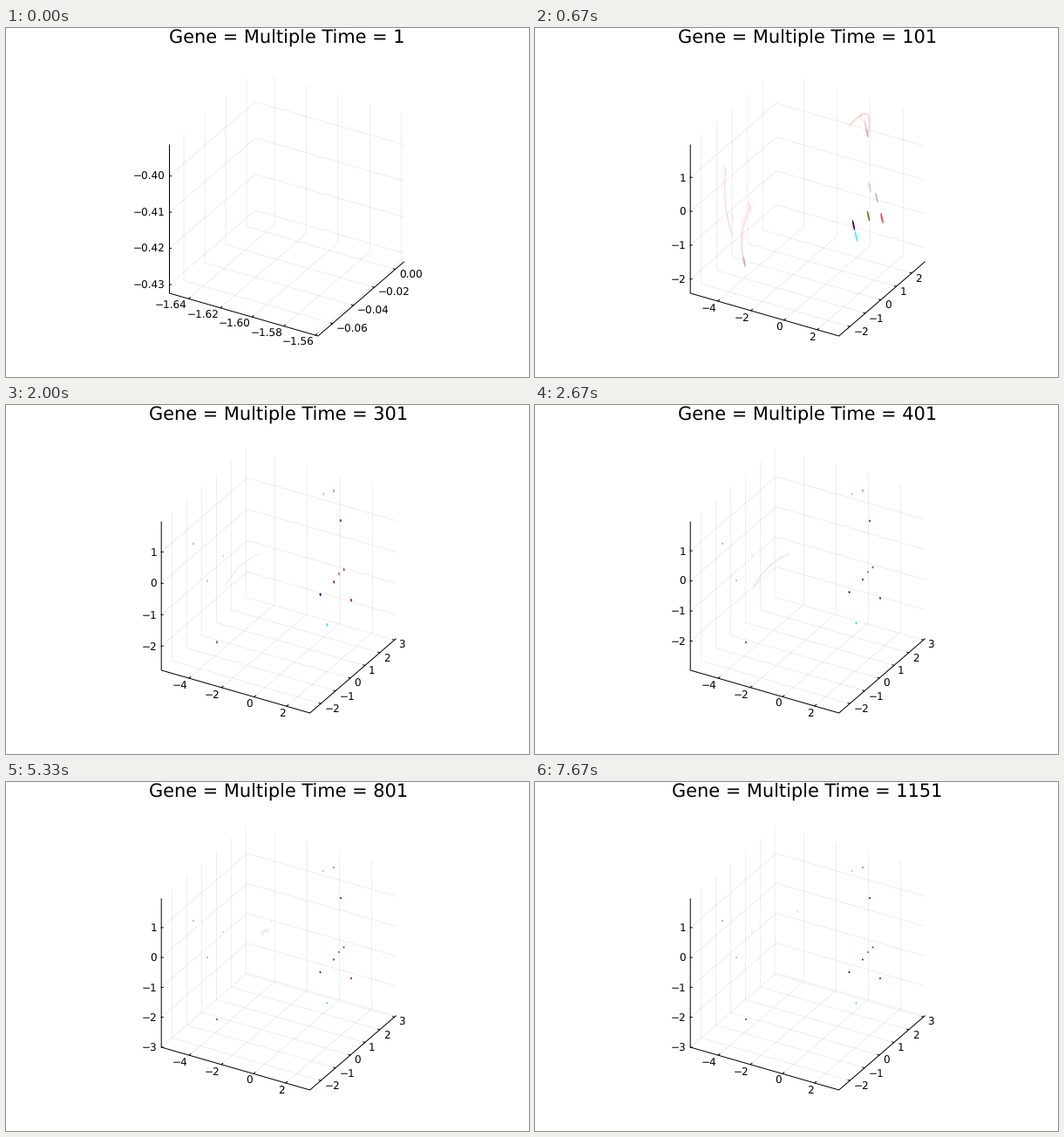
Animation, 600 px wide and 400 px high, one loop 8 s. Source, as a matplotlib script:

```python
import math
import numpy as np
import matplotlib.pyplot as plt
from matplotlib.animation import FuncAnimation
from matplotlib.colors import to_rgb
from matplotlib.patches import Ellipse

W, H, DPI = 600, 400, 100
LOOP_MS, FRAMES = 8000, 100
STATES, STEP = 24, 50

plt.rcParams["font.family"] = "DejaVu Sans"
plt.rcParams["text.hinting"] = "none"
fig = plt.figure(figsize=(W / DPI, H / DPI), dpi=DPI, facecolor="white")
ax = fig.add_axes([0, 0, 1, 1])

# Screen vectors of the three box edges
EDGE_X = np.array([170.5, 49.0])
EDGE_Y = np.array([98.5, -85.0])
EDGE_Z = np.array([0.0, -170.0])

# first colour, last colour, place when the trail is long, resting place
UPPER_CELLS = [
    ("#dcb4b0", "#8c1c2c", (381, 120), (384, 133)),
    ("#f6d4ca", "#c48080", (379, 111), (376, 98)),
    ("#fbeeee", "#cfc4c4", (374, 102), (364, 102)),
    ("#fbeef0", "#b2b2b2", (218, 163), (215, 159)),
    ("#fbeef0", "#bdbdbd", (226, 216), (231, 201)),
    ("#f9e6ea", "#dcdcdc", (246, 204), (249, 172)),
    ("#b8b0b0", "#4c6c58", (240, 268), (242, 272)),
]
LOWER_CELLS = [
    ("#521064", "#4a0a50", (365.5, 226), (360.5, 218)),
    ("#40f4ff", "#20dcf4", (368.5, 239), (368.5, 253.5)),
    ("#e65050", "#b01414", (398, 218), (396, 225)),
    ("#857d2c", "#9a2a24", (382.5, 215.5), (376, 203.5)),
    ("#c6bfb8", "#904848", (392, 194.5), (387.5, 189.5)),
    ("#e2d4d2", "#c05a5a", (384, 182.5), (382, 195)),
]

# colour, start, end, bend, time of full strength, fade span
WISPS = [
    ("#f8c4cc", (218, 161), (227, 238), -0.05, 101, 60),
    ("#f6b4c0", (248, 204), (240, 270), -0.1, 101, 60),
    ("#f0b0a4", (361, 112), (381, 122), 0.9, 101, 60),
    ("#f49c80", (377, 98), (376, 110), -0.1, 201, 60),
    ("#d0a4a8", (380, 119), (384, 148), 0.0, 201, 70),
    ("#f0ccd2", (252, 209), (292, 171), 0.1, 430, 170),
    ("#d0c4c4", (294, 174), (300, 170), 0.3, 801, 120),
]


def ease(t, start, end):
    u = min(max((t - start) / (end - start), 0), 1)
    return u * u * (3 - 2 * u)


def bump(t, peak, span):
    return math.exp(-((t - peak) / span) ** 2)


def mix(a, b, u):
    return tuple((1 - u) * np.array(to_rgb(a)) + u * np.array(to_rgb(b)))


def line(*points, color="black", lw=1.0, alpha=1.0):
    xs, ys = zip(*points)
    ax.plot(xs, ys, color=color, lw=lw * 72 / DPI, alpha=alpha, snap=False)


def text(x, y, label, size=12, ha="right"):
    ax.text(x, y, label, fontsize=size * 72 / DPI, ha=ha, va="baseline")


def dot(center, width, height, color):
    ax.add_patch(Ellipse(center, width, height, angle=-12, color=color, lw=0))


def tick_values(lo, hi, step):
    first, last = math.ceil(lo / step), math.floor(hi / step)
    return [(k * step, (k * step - lo) / (hi - lo)) for k in range(first, last + 1)]


def draw_box(origin, limits, steps, decimals):
    back, front = origin + EDGE_Y, origin + EDGE_X
    x_ticks, y_ticks, z_ticks = [tick_values(*lim, s) for lim, s in zip(limits, steps)]
    grid = dict(alpha=0.1, lw=0.65)

    def label(x, y, value, ha="right"):
        text(x, y + 4.4, f"{value:.{decimals}f}".replace("-", "\u2212"), ha=ha)

    for value, u in x_ticks:
        p = origin + u * EDGE_X
        line(p, p + EDGE_Y, p + EDGE_Y + EDGE_Z, **grid)
        line(p, p + 0.018 * EDGE_Y)
        label(p[0] - 1.5, p[1] + 7.5, value)
    for value, u in y_ticks:
        p = origin + u * EDGE_Y
        q = p + EDGE_X
        line(q, p, p + EDGE_Z, **grid)
        line(q, q - 0.012 * EDGE_X)
        label(q[0] + 4.2, q[1] + 5.5, value, ha="left")
    for value, u in z_ticks:
        lift = u * EDGE_Z
        p = origin + lift
        line(p, back + lift, back + EDGE_X + lift, **grid)
        line(p, p + (2, 0))
        label(p[0] - 5, p[1], value)

    line(origin + EDGE_Z, origin, front, front + EDGE_Y)


def data_limits(t):
    """Limits widen as the cells spread out."""
    grow, grow_y = ease(t, 101, 451), ease(t, 101, 201)
    return [(-5.658 - 0.082 * grow, 3.316 + 0.2 * grow),
            (-2.704 - 0.036 * grow_y, 2.845 + 0.245 * grow_y),
            (-2.42 - 0.582 * grow, 1.96)]


def draw_cell(t, first, last, start, rest, lift):
    """A cell settles at its resting place while its trail shrinks to a dot."""
    age = max(t - 101, 0)
    start, rest = np.array(start), np.array(rest)
    center = rest + (start - rest) * math.exp(-age / 60) - (0, lift)
    length = 2.1 + 10.5 * math.exp(-(t - 101) / 100)
    dot(center, 2.1, length, mix(first, last, 1 - math.exp(-age / 150)))


def draw_wisp(t, seed, color, start, end, bend, peak, span):
    strength = bump(t, peak, span)
    if strength < 0.03:
        return
    rng = np.random.default_rng(seed)
    start, end = np.array(start), np.array(end)
    dx, dy = end - start
    control = (start + end) / 2 + 2 * bend * np.array([dy, -dx])
    s = np.linspace(0, 1, 20)[:, None]
    for _ in range(6):
        a, c, b = np.array([start, control, end]) + rng.normal(0, 1.4, (3, 2))
        curve = (1 - s) ** 2 * a + 2 * s * (1 - s) * c + s ** 2 * b
        line(*curve, color=color, lw=0.9, alpha=0.2 * strength)


def draw_drifter(t):
    """One pale cell that leaves the middle late and floats upward."""
    u = min(max((t - 651) / 500, 0), 1)
    rise = 1 - (1 - u) ** 2
    center = (297 + 4 * u + 7 * math.sin(math.pi * u), 172 - 23.5 * rise)
    dot(center, 2, 2, mix("white", "#d8d8d8", rise))


def draw(i):
    # Each picture shows the state reached by its end
    state = min((i + 1) * STATES // FRAMES, STATES - 1)
    t = 1 + STEP * state
    ax.clear()
    ax.set_xlim(0, W)
    ax.set_ylim(H, 0)
    ax.axis("off")

    if state == 0:
        origin = np.array([187.5, 304.0])
        limits = [(-1.6521, -1.5584), (-0.0738, 0.0083), (-0.4324, -0.3914)]
        draw_box(origin, limits, (0.02, 0.02, 0.01), 2)
    else:
        origin = np.array([178.2, 304.0])
        draw_box(origin, data_limits(t), (2, 1, 1), 0)
        for seed, wisp in enumerate(WISPS):
            draw_wisp(t, seed, *wisp)
        for cell in UPPER_CELLS:
            draw_cell(t, *cell, lift=0)
        for cell in LOWER_CELLS:
            draw_cell(t, *cell, lift=3.5 * bump(t, 401, 90))
        draw_drifter(t)

    text(origin[0] + 134.4, 18, f"Gene = Multiple Time = {t}", 20.85, "center")
    return []


anim = FuncAnimation(fig, draw, frames=FRAMES, init_func=lambda: [],
                     interval=LOOP_MS // FRAMES, repeat=True, repeat_delay=0, blit=False)
plt.show()
```
